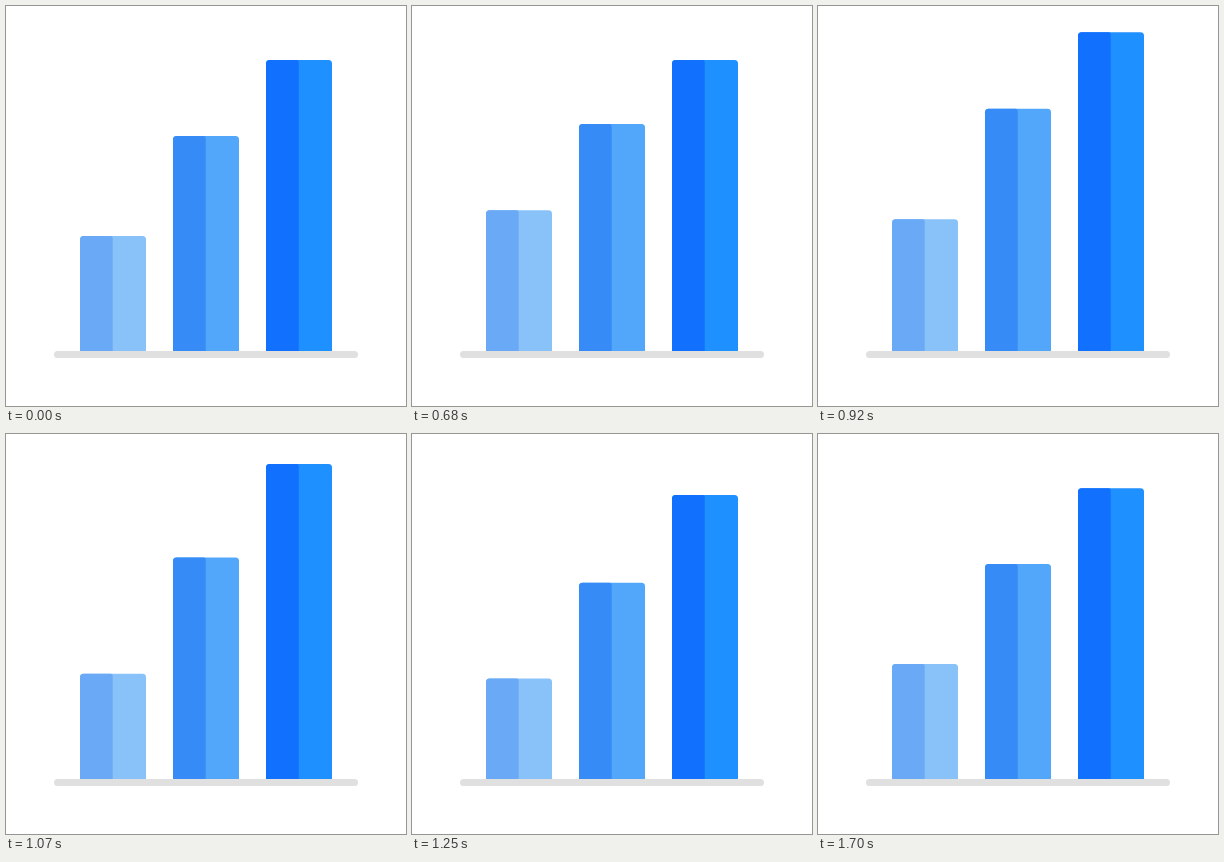
Recreate the animation shown at these times as an HTML page. Size 400x400 px, loop 1730 ms.

```html
<!DOCTYPE html>
<html lang="en">
<head>
<meta charset="utf-8">
<title>Bar chart</title>
<style>
  html, body { margin: 0; width: 100%; height: 100%; overflow: hidden; background: #fff; }
  svg { display: block; width: 100%; height: 100%; }
</style>
</head>
<body>
<svg id="stage" viewBox="0 0 400 400" xmlns="http://www.w3.org/2000/svg"></svg>
<script>
const LOOP = 1730, START = 530, STEP = 30, STAGGER = 100;
const BASE = 346, WIDTH = 66, HALF = 32.7;

const bars = [
  { x: 74, top: 230, dark: '#69a9f5', light: '#89c2f9' },
  { x: 167, top: 130, dark: '#378bf7', light: '#53a7fb' },
  { x: 260, top: 54, dark: '#1270ff', light: '#1f90ff' }
];

// Offset of a bar top over time: stretch up, dip below rest, settle.
const wave = [
  [-22, 0], [50, -12], [150, -25.8], [240, -28], [310, -26.6], [340, -24],
  [390, -16.8], [440, -6.5], [530, 8.5], [620, 18.7], [645, 19],
  [725, 14.2], [830, 7], [930, 1.2], [1000, 0]
];

const svg = document.getElementById('stage');

function add(tag, attrs) {
  const el = document.createElementNS(svg.namespaceURI, tag);
  for (const key in attrs) el.setAttribute(key, attrs[key]);
  return svg.appendChild(el);
}

function slope(i) {
  const a = wave[i - 1], p = wave[i], b = wave[i + 1];
  if (!a || !b || (p[1] - a[1]) * (b[1] - p[1]) <= 0) return 0;
  return (b[1] - a[1]) / (b[0] - a[0]);
}

function offset(t) {
  const i = wave.findIndex(p => p[0] > t) - 1;
  if (i < 0) return 0;
  const [t0, y0] = wave[i], [t1, y1] = wave[i + 1];
  const span = t1 - t0, u = (t - t0) / span, v = 1 - u;
  return v * v * (1 + 2 * u) * y0 + u * u * (3 - 2 * u) * y1
    + span * u * v * (v * slope(i) - u * slope(i + 1));
}

function column(x, y, w, left, right) {
  return `M${x} ${BASE}V${y + left}q0 ${-left} ${left} ${-left}H${x + w - right}` +
    `q${right} 0 ${right} ${right}V${BASE}Z`;
}

for (const bar of bars) {
  bar.back = add('path', { fill: bar.light });
  bar.front = add('path', { fill: bar.dark });
}
add('rect', { x: 48, y: 345, width: 304, height: 7, rx: 3.5, fill: '#e0e0e0' });

function draw(time) {
  const t = time % LOOP;
  const tick = Math.floor((t - START) / STEP) * STEP;
  bars.forEach((bar, i) => {
    const y = bar.top + (t < START ? 0 : offset(tick - i * STAGGER));
    bar.back.setAttribute('d', column(bar.x, y, WIDTH, 3.5, 3.5));
    bar.front.setAttribute('d', column(bar.x, y, HALF, 3.5, 2));
  });
}

const begin = performance.now();
function frame() {
  draw(performance.now() - begin);
  requestAnimationFrame(frame);
}
frame();
</script>
</body>
</html>
```
